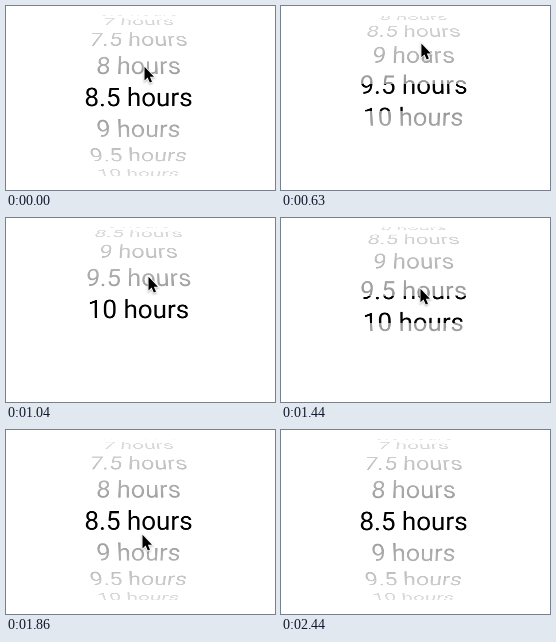
These frames come from a looping animation (269x184 px, 2.89 s). An HTML page with a canvas:

```html
<!DOCTYPE html>
<html lang="en">
<head>
<meta charset="utf-8">
<title>Hours wheel</title>
<style>
html, body { margin: 0; width: 100%; height: 100%; overflow: hidden; background: #fff; }
canvas { display: block; }
</style>
</head>
<body>
<canvas id="stage" width="269" height="184"></canvas>
<script>
const LOOP = 2890, TICK = LOOP / 50;
const W = 269, H = 184, CX = 132.5, CY = 91.2;
const RADIUS = 82.3, ITEM = RADIUS * Math.PI / 8;
const LAST = 10;                            // the list ends at 10 hours
const BAND_TOP = 78, BAND_BOTTOM = 105;     // rows shown in black
const K = 2, FLAT_H = 300;

// Pointer stops: tick, x, y
const STOPS = [
  [0, 138, 60], [7, 139, 61], [12, 140, 34], [18, 142, 58], [23, 140, 58],
  [29, 136, 104], [32, 136, 104], [36, 203, 153], [39, 203, 153], [42, 221, 178]
];

const ctx = document.getElementById('stage').getContext('2d');
const flat = document.createElement('canvas');
flat.width = W * K;
flat.height = FLAT_H * K;
const fctx = flat.getContext('2d');
const arrow = new Path2D('M0 0V13.6L3.1 10.8L5.3 15.8L7.5 14.9L5.4 10H9.5Z');

const sigmoid = x => 1 / (1 + Math.exp(-x));
const smooth = p => p * p * (3 - 2 * p);

// One flick to the end of the list, then one back
const hoursAt = tick => 8.5 + 1.5 * (sigmoid(1.5 * (tick - 10.1)) - sigmoid(tick - 26.85));

// The unrolled list, with the selected value in the middle
function drawFlat(hours) {
  fctx.setTransform(K, 0, 0, K, 0, 0);
  fctx.clearRect(0, 0, W, FLAT_H);
  fctx.font = '26px Roboto, sans-serif';
  fctx.textAlign = 'center';
  const first = Math.round(hours * 2) - 4;
  for (let i = first; i <= Math.min(first + 8, LAST * 2); i++) {
    const y = FLAT_H / 2 + (i - hours * 2) * ITEM;
    fctx.fillText(i / 2 + ' hours', CX, y + 9);
  }
}

// Wraps the list around a cylinder, one stage row at a time
function drawWheel() {
  const arc = y => RADIUS * Math.asin((y - CY) / RADIUS);
  for (let y = Math.ceil(CY - RADIUS); y < CY + RADIUS - 1; y++) {
    const top = arc(y), height = arc(y + 1) - top;
    const angle = (top + height / 2) / RADIUS;
    const scale = 1 / (1 + 0.39 * (1 - Math.cos(angle)));
    const inBand = y >= BAND_TOP && y < BAND_BOTTOM;
    ctx.globalAlpha = inBand ? 1 : 0.47 * (1 - 0.75 * Math.abs(Math.sin(angle)));
    ctx.drawImage(flat, 0, (FLAT_H / 2 + top) * K, W * K, height * K,
      CX - CX * scale, y, W * scale, 1);
  }
  ctx.globalAlpha = 1;
}

function drawPointer(tick) {
  const i = STOPS.findIndex(s => s[0] > tick);
  if (i < 0) return;
  const [t0, x0, y0] = STOPS[i - 1], [t1, x1, y1] = STOPS[i];
  const p = smooth((tick - t0) / (t1 - t0));
  ctx.save();
  ctx.translate(x0 + (x1 - x0) * p + 0.5, y0 + (y1 - y0) * p + 0.8);
  ctx.strokeStyle = '#fff';
  ctx.lineWidth = 1.6;
  ctx.shadowColor = 'rgba(0, 0, 0, 0.3)';
  ctx.shadowBlur = 2;
  ctx.shadowOffsetY = 1;
  ctx.stroke(arrow);
  ctx.shadowColor = 'transparent';
  ctx.fill(arrow);
  ctx.restore();
}

function frame() {
  const tick = Math.floor((performance.now() % LOOP + 10) / TICK) % 50;
  ctx.fillStyle = '#fff';
  ctx.fillRect(0, 0, W, H);
  ctx.fillStyle = '#000';
  drawFlat(hoursAt(tick));
  drawWheel();
  drawPointer(tick);
  requestAnimationFrame(frame);
}
frame();
</script>
</body>
</html>
```
